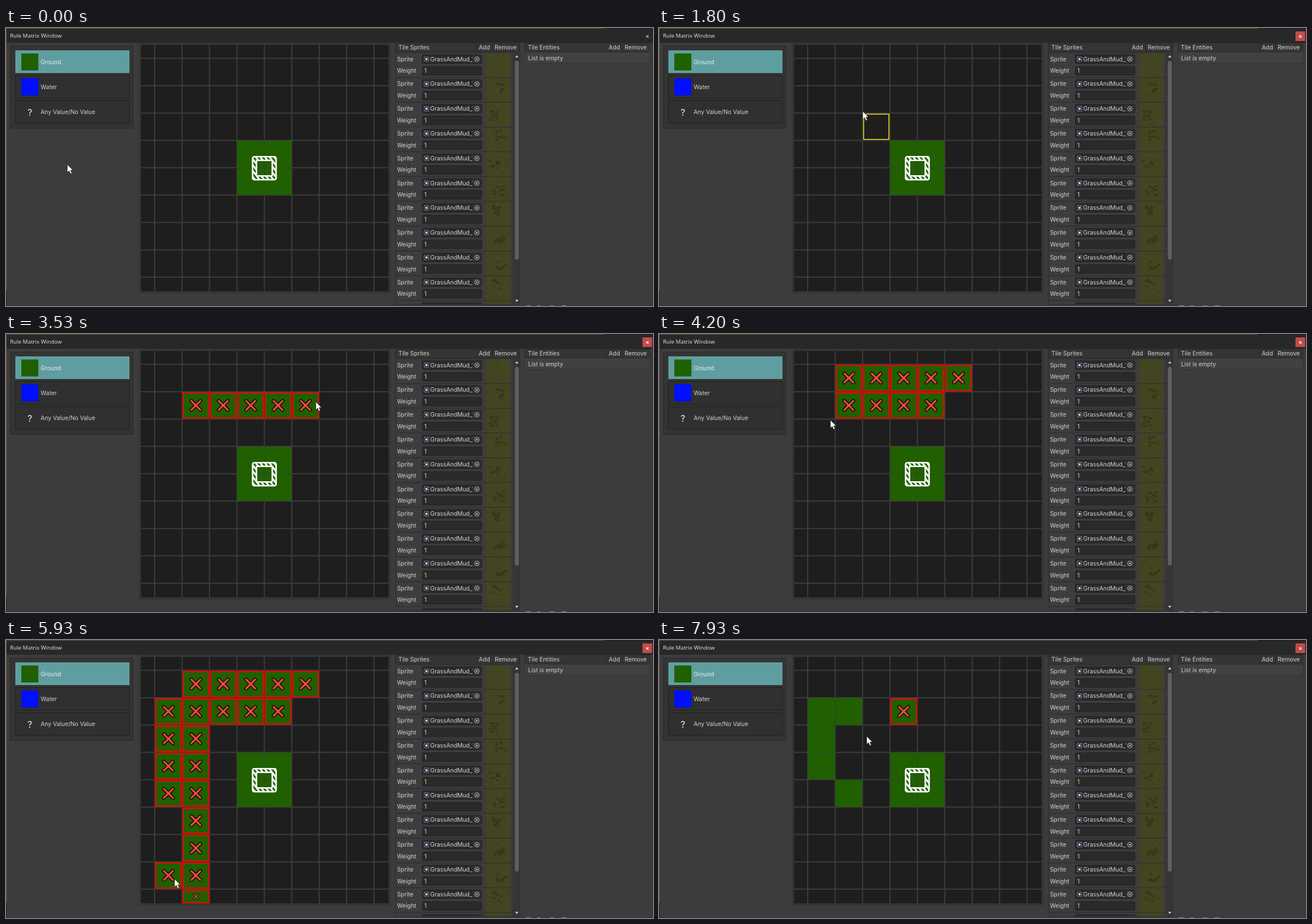
Write an HTML page that moves like this. It is 1140 px wide and 491 px high and loops after 8 s.

```html
<!DOCTYPE html>
<html lang="en">
<head>
<meta charset="utf-8">
<title>Rule Matrix Window</title>
<style>
html, body { margin: 0; width: 100%; height: 100%; overflow: hidden; background: #3c3c3c; }
svg { display: block; width: 100vw; height: 100vh; }
text { font: 10.3px Inter, "Liberation Sans", sans-serif; fill: #d2d2d2; white-space: pre; }
text.title { font: 9.8px "Open Sans", "Noto Sans", sans-serif; fill: #e4e4e4; }
text.mark { font-size: 16px; fill: #f4f4f4; }
</style>
</head>
<body>
<svg viewBox="0 0 1140 491" preserveAspectRatio="none">
  <defs>
    <pattern id="hatch" width="6.4" height="6.4" patternUnits="userSpaceOnUse" patternTransform="rotate(-38)">
      <rect width="3.2" height="6.4" fill="#fff"/>
    </pattern>
    <clipPath id="nameClip"><rect x="734" y="40" width="88" height="447"/></clipPath>
    <clipPath id="listClip"><rect x="686" y="43" width="209" height="445"/></clipPath>
    <g id="cross" stroke-linecap="round" fill="none">
      <path d="M-8-8 8 8M8-8-8 8" stroke="#0c0c0c" stroke-width="6.4"/>
      <path d="M-8-8 8 8M8-8-8 8" stroke="#ff483c" stroke-width="3.2"/>
    </g>
  </defs>
  <g id="window"></g>
  <g id="cells"></g>
  <g fill="none" stroke="#fff" stroke-width="2.6">
    <rect x="434.5" y="227.2" width="41.4" height="40.8" rx="3"/>
    <rect x="438" y="230.7" width="34.4" height="33.8" stroke="url(#hatch)" stroke-width="5"/>
    <rect x="441.3" y="233.8" width="27.8" height="27.4" rx="2"/>
  </g>
  <g id="close"></g>
  <path id="cursor" d="M0 0V14.2L3.2 11.3 5.6 16.6 8.1 15.5 5.7 10.3H10Z" fill="#fff" stroke="#161616" stroke-width=".7"/>
</svg>
<script>
const LOOP = 8000, FRAME = 200 / 3;
const GREEN = '#206000', CELL = 48.3, LEFT = 262, TOP = 53.6;
const byId = id => document.getElementById(id);

const rect = (x, y, w, h, fill, extra = '') =>
  `<rect x="${x}" y="${y}" width="${w}" height="${h}" fill="${fill}" ${extra}/>`;
const label = (x, mid, str, extra = '') =>
  `<text x="${x}" y="${mid + 3.7}" ${extra}>${str}</text>`;
const line = (d, color, width = 1) =>
  `<path d="${d}" fill="none" stroke="${color}" stroke-width="${width}"/>`;

function random(seed) {
  return () => (seed = (seed * 16807) % 2147483647) / 2147483647;
}

// ---- static window ----
function frameBar() {
  return rect(0, 0, 1140, 491, '#3c3c3c') + rect(0, 0, 1140, 26, '#282828') +
    rect(0, 0, 1055, 1, '#65552f') + rect(1055, 0, 85, 1, '#1c1c1c') +
    rect(0, 0, 1, 464, '#75633a') + rect(0, 464, 1, 27, '#202020') +
    rect(1139, 26, 1, 465, '#303030') + rect(0, 490, 1140, 1, '#303030') +
    line('M916 490.5h9m11 0h6m16 0h8m13 0h9', '#8c8c8c') +
    label(7, 12.8, 'Rule Matrix Window', 'class="title"');
}

function palette() {
  const button = (i, fill, edge) =>
    rect(15.5, 38.5 + i * 44.4, 203, 42, '#262626', 'rx="2"') +
    rect(17, 40 + i * 44.4, 200, 39, fill, `stroke="${edge}"`);
  return rect(8, 32, 215.5, 145, '#343434', 'stroke="#2f2f2f" stroke-width="2"') +
    button(0, '#5f9ea0', '#72b0b2') + button(1, '#303030', '#2b2b2b') + button(2, '#303030', '#2b2b2b') +
    rect(27, 45, 30, 30, GREEN) + rect(27, 89, 30, 30, '#0010ff') +
    label(61, 60, 'Ground', 'style="fill:#eee"') + label(61, 104, 'Water') +
    label(61, 148.5, 'Any Value/No Value') +
    '<text x="42" y="154.5" class="mark" text-anchor="middle">?</text>';
}

function grid() {
  let d = '';
  for (let i = 0; i < 9; i++) {
    d += `M${LEFT + i * CELL} 30V465M238 ${TOP + i * CELL}H674`;
  }
  return rect(234, 26, 444, 443, '#353535') + rect(238, 30, 436, 435, '#1e1e1e') + line(d, '#3c3c3c', 2);
}

function header(x, w, title, split) {
  return rect(x, 26.5, w, 16, '#353535', 'stroke="#2a2a2a"') +
    line(`M${split} 27v15m28.5-15v15`, '#2a2a2a') +
    label(x + 5, 34.6, title) + label(split + 4, 34.6, 'Add') + label(split + 32, 34.6, 'Remove');
}

function thumb(i, y) {
  const rnd = random(731 + i * 97);
  let out = rect(846.5, y, 41.5, 42, '#434521');
  for (let n = 0; n < 16; n++) {
    out += rect(848 + rnd() * 35, y + 1 + rnd() * 37, 2 + rnd() * 2, 1.5, n % 2 ? '#4b4d27' : '#3d3f1d');
  }
  // dark mud patches gather around one spot per tile
  const patches = i ? 9 : 0, cx = 857 + rnd() * 14, cy = y + 12 + rnd() * 14;
  for (let n = 0; n < patches; n++) {
    out += rect(cx - 9 + rnd() * 18, cy - 9 + rnd() * 18, 3 + rnd() * 5, 2 + rnd() * 3, '#36381b');
  }
  return out;
}

function spriteRow(i) {
  const y = 55 + i * 43.78;
  const field = top => rect(733.5, top, 105, 15.4, '#2a2a2a', 'rx="2" stroke="#202020"');
  return rect(687, y - 11, 206, 42.6, '#3d3d3d', 'stroke="#343434" stroke-width="1.4"') +
    label(689, y, 'Sprite') + label(689, y + 20.6, 'Weight') + field(y - 7.7) + field(y + 12.9) +
    rect(737, y - 4, 8, 8, 'none', 'stroke="#9b8bd0" stroke-width="1.2" stroke-dasharray="2.4 1.6"') +
    rect(739.2, y - 1.8, 3.6, 3.6, '#d5cff0') +
    label(747.5, y, 'GrassAndMud_' + (i < 6 ? 1 : 2), 'clip-path="url(#nameClip)"') +
    rect(822, y - 7, 16, 14, '#303030') +
    `<circle cx="829.7" cy="${y}" r="4" fill="none" stroke="#c4c4c4"/><circle cx="829.7" cy="${y}" r="1.5" fill="#c4c4c4"/>` +
    label(737, y + 20.6, '1') + thumb(i, y - 10.5);
}

function sprites() {
  let rows = '';
  for (let i = 0; i < 11; i++) rows += spriteRow(i);
  return rect(686, 26, 219.5, 462.5, '#3d3d3d', 'stroke="#303030"') +
    `<g clip-path="url(#listClip)">${rows}</g>` +
    header(686.5, 218, 'Tile Sprites', 829) +
    rect(894.5, 43, 10.5, 445, '#353535') + rect(896.5, 58, 7.3, 351, '#5f5f5f', 'rx="3.5"') +
    '<path d="M897 52h6l-3-4zM897 480h6l-3 4z" fill="#c8c8c8"/>';
}

function entities() {
  return rect(914.5, 42.5, 220, 20, '#414141', 'stroke="#333"') +
    header(914.5, 220, 'Tile Entities', 1058) + label(920, 52.8, 'List is empty');
}

byId('window').innerHTML = frameBar() + palette() + grid() + sprites() + entities();

// ---- motion: time, x, y of the pointer tip ----
const PATH = [
  [0, 108, 241], [400, 124, 298], [870, 118, 219], [1200, 112, 66],
  [1600, 300, 177], [1733, 366, 167], [1800, 359, 147], [1930, 327, 125],
  [2530, 506, 130], [2600, 507, 130], [2930, 330, 124], [3470, 548, 130],
  [3670, 530, 85], [3950, 335, 80], [4200, 302, 152], [4430, 290, 125],
  [4730, 285, 268], [4800, 330, 268], [4930, 342, 172], [5135, 355, 452],
  [5270, 338, 445], [5660, 336, 312], [5933, 297, 422], [6200, 332, 446],
  [6470, 335, 80], [6530, 292, 122], [6800, 302, 312], [6930, 338, 190],
  [7070, 385, 80], [7250, 526, 76], [7450, 382, 132], [7533, 335, 192],
  [7600, 335, 192], [7730, 332, 266], [7800, 284, 222], [7870, 290, 138],
  [7933, 366, 170]
];

// tile strokes: kind, direction, start, delay, column, row, count
const STROKES = [
  ['green', 'right', 1930, 140, 2, 2, 5],
  ['red', 'right', 3000, 90, 2, 2, 5],
  ['none', 'left', 3600, 0, 6, 2, 1],
  ['red', 'left', 3670, 70, 6, 1, 5],
  ['red', 'down', 4470, 75, 1, 2, 4],
  ['red', 'up', 4800, 65, 2, 5, 3],
  ['red', 'up', 5270, 130, 2, 9, 4],
  ['red', 'up', 5870, 0, 1, 8, 1],
  ['none', 'up', 6130, 0, 1, 8, 1],
  ['none', 'up', 6200, 33, 2, 9, 9],
  ['none', 'down', 6530, 60, 1, 2, 4],
  ['none', 'right', 7070, 60, 3, 1, 4],
  ['none', 'left', 7330, 0, 5, 2, 1],
  ['none', 'left', 7450, 0, 3, 2, 1],
  ['green', 'up', 7730, 0, 2, 5, 1],
  ['green', 'up', 7800, 33, 1, 4, 3],
  ['green', 'right', 7930, 0, 2, 2, 1]
];
const STEP = { right: [1, 0], left: [-1, 0], down: [0, 1], up: [0, -1] };
const HOVER = [[1530, 3000], [4260, 4320]];

function slope(i, axis) {
  const a = PATH[Math.max(0, i - 1)], b = PATH[Math.min(PATH.length - 1, i + 1)], p = PATH[i];
  // turning points get a flat tangent, so the curve never overshoots
  if ((p[axis] - a[axis]) * (b[axis] - p[axis]) <= 0) return 0;
  const s = (p[axis] - a[axis]) / (p[0] - a[0]), e = (b[axis] - p[axis]) / (b[0] - p[0]);
  return 2 * s * e / (s + e);
}

function pointer(t) {
  const i = PATH.findIndex(p => p[0] > t) - 1;
  if (i < 0) return PATH[PATH.length - 1].slice(1);
  const a = PATH[i], b = PATH[i + 1], span = b[0] - a[0], u = (t - a[0]) / span, rest = 1 - u;
  return [1, 2].map(n =>
    a[n] * rest * rest * (1 + 2 * u) + b[n] * u * u * (3 - 2 * u) +
    span * u * rest * (rest * slope(i, n) - u * slope(i + 1, n)));
}

function tilesAt(t) {
  const tiles = { '4,4': 'green', '5,4': 'green', '4,5': 'green', '5,5': 'green' };
  for (const [kind, way, start, delay, c, r, count] of STROKES) {
    const [dc, dr] = STEP[way];
    for (let n = 0; n < count; n++) {
      if (start + n * delay <= t + 5) tiles[(c + dc * n) + ',' + (r + dr * n)] = kind;
    }
  }
  return tiles;
}

function box(c, r) {
  const x = LEFT + (c - 1) * CELL, y = TOP + (r - 1) * CELL;
  return { x, y, w: CELL, h: Math.min(CELL, 466 - y) };
}

function outline(b, color, width) {
  return rect(b.x + 2, b.y + 2, b.w - 3.8, b.h - 3.8, 'none', `stroke="${color}" stroke-width="${width}"`);
}

function drawTile([key, kind]) {
  if (kind === 'none') return '';
  const b = box(...key.split(',').map(Number));
  const base = rect(b.x + .5, b.y + .5, b.w - 1, b.h - 1, GREEN);
  if (kind === 'green') return base;
  const size = b.h < 40 ? .5 : 1;
  return rect(b.x + 1, b.y + 1, b.w - 2, b.h - 2, GREEN) + outline(b, '#f00400', 2.2) +
    `<use href="#cross" transform="translate(${b.x + b.w / 2} ${b.y + b.h / 2}) scale(${size})"/>`;
}

function drawHover(t, tiles) {
  if (!HOVER.some(([from, to]) => t >= from && t < to)) return '';
  // the highlight trails the pointer by one step
  const [x, y] = pointer(t - FRAME);
  const c = Math.floor((x - LEFT) / CELL) + 1, r = Math.floor((y - TOP) / CELL) + 1;
  if (c < 1 || tiles[c + ',' + r] === 'red') return '';
  return outline(box(c, r), '#fff01c', 1.4);
}

function drawClose(active) {
  const glyph = color => line('M1128 12.8l4.2 4.2m0-4.2l-4.2 4.2', color, 1.1);
  return active ? rect(1121.5, 6, 17, 17, '#c44b4b') + glyph('#fff') : glyph('#bbb');
}

const begin = performance.now();
let shown = -1;

function tick() {
  const now = (performance.now() - begin) % LOOP;
  const step = Math.floor((now + 4) / FRAME) % 120;
  if (step !== shown) {
    shown = step;
    const t = step * FRAME, tiles = tilesAt(t), [x, y] = pointer(t);
    byId('cells').innerHTML = Object.entries(tiles).map(drawTile).join('') + drawHover(t, tiles);
    byId('close').innerHTML = drawClose(step > 0);
    byId('cursor').setAttribute('transform', `translate(${x.toFixed(2)} ${y.toFixed(2)})`);
  }
  requestAnimationFrame(tick);
}
tick();
</script>
</body>
</html>
```
